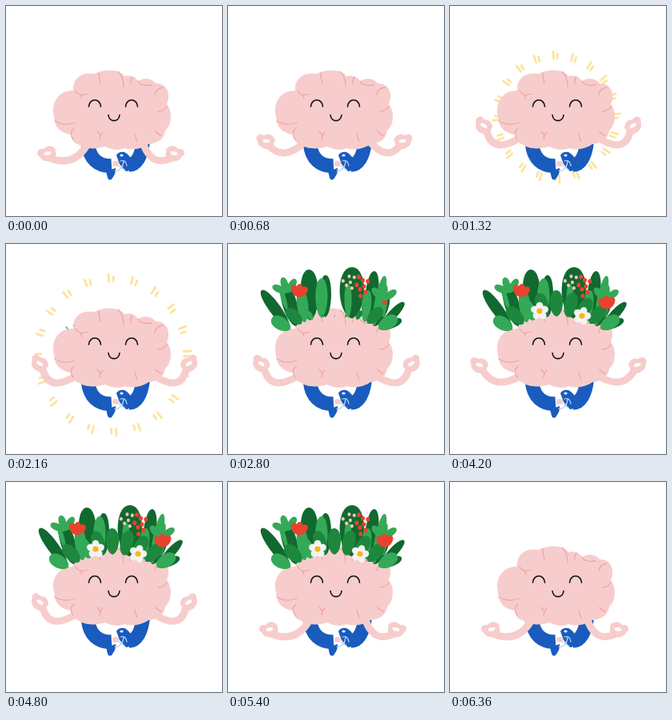
These frames come from a looping animation (270 px wide and 263 px high, 6400 ms). An HTML page with a canvas:

```html
<!DOCTYPE html>
<html lang="en">
<head>
<meta charset="utf-8">
<title>Blooming mind</title>
<style>
html, body { margin: 0; width: 100%; height: 100%; overflow: hidden; background: #fff; }
canvas { display: block; width: 270px; height: 263px; }
</style>
</head>
<body>
<canvas id="stage" width="270" height="263"></canvas>
<script>
const ctx = document.getElementById('stage').getContext('2d');
const LOOP = 6400, TAU = Math.PI * 2, MIDDLE = 134;
const SKIN = '#f6cdcc', FOLD = '#f3a5a3', BLUE = '#195cbd', RED = '#e8432f';
const DARK = '#11692f', MID = '#1d873d', LIGHT = '#34a957';

const clamp = u => Math.max(0, Math.min(1, u));
const smooth = u => { u = clamp(u); return u * u * (3 - 2 * u); };
const mix = (a, b, u) => a.map((v, i) => v + (b[i] - v) * u);
const ramp = (t, from, to) => smooth((t - from) / (to - from));
const grow = (t, start) => ramp(t, start, start + 420) * (1 - ramp(t, 5450, 6110));

// Left arm: shoulder, elbow, hand, hand angle, axis that mirrors the hand
const LOW = [100, 176, 84, 201, 51, 186, 0, 131];
const UP = [88, 165, 52, 187, 40.5, 150, .85, 135.5];
const WIDE = [88, 165, 58, 182, 31, 154, .3, 135.5];

const brain = new Path2D(`M59 133 C58 117 69 105 84 106 C83 91 94 82 111 85
  C122 78 143 79 148 88 C155 86 162 89 165 94 C174 88 184 92 187 97
  C200 96 207 109 201 123 C208 131 208 149 199 156 C198 166 190 172 178 173
  C170 179 157 181 148 178 C140 182 130 179 124 176 C112 180 97 179 90 173
  C85 172 82 168 81 161 C71 160 63 154 61 145 Z`);
const folds = new Path2D(`M87 106 Q91 114 102 110 M93 111 L95 116 M116 84 Q116 91 118 97
  M140 82 Q147 88 147 101 M158 89 Q155 93 156 98 M165 94 Q168 101 182 99
  M186 111 Q187 103 196 102 M190 132 Q197 132 201 126 M61 144 Q73 151 86 146
  M84 167 Q78 159 85 153 M114 157 L118 162 L121 158 M118 162 L117 167
  M161 160 Q162 166 164 170 M187 157 Q190 161 194 162`);
const face = new Path2D(`M103.5 126 C104 115 118 115 118.5 126
  M149.5 126 C150 115 164 115 164.5 126 M128 136.5 C129 146 141 146 142 136.5`);
const legs = new Path2D('M102.5 172 C104 191 115 201 132 200 M171 172 C169 188 163 199 154 199');
const shoes = new Path2D(`M125 207 L137 203 Q138 209 132 217 Q128 219 127 215 Z
  M138 187 Q141 182 148 183 Q156 187 157 195 Q158 207 150 207 L142 198 Z`);
const laces = new Path2D('M136 206 Q141 208 145 201 M141 200 L148 205 M143 194 Q150 192 151 200 M147 195 L145 203');

function stroke(path, color, width) {
  ctx.strokeStyle = color;
  ctx.lineWidth = width;
  ctx.stroke(path);
}

function fill(path, color) {
  ctx.fillStyle = color;
  ctx.fill(path);
}

function oval(x, y, rx, ry, color, angle = 0) {
  const path = new Path2D();
  path.ellipse(x, y, rx, ry, angle, 0, TAU);
  fill(path, color);
}

// Draws in local coordinates; a negative scale mirrors sideways
function place(x, y, angle, scale, draw) {
  if (!scale) return;
  ctx.save();
  ctx.translate(x, y);
  ctx.rotate(angle);
  ctx.scale(scale, Math.abs(scale));
  draw();
  ctx.restore();
}

function drawRays(t) {
  if (t < 700 || t > 2560) return;
  const reach = t < 1320
    ? 50 + 32 * (1 - (1 - (t - 700) / 620) ** 2)
    : 82 + 27 * clamp((t - 1320) / 1180);
  const path = new Path2D();
  for (let i = 0; i < 40; i++) {
    const short = i % 2;
    const a = (i - short) * TAU / 40 - .05 + short * .064;
    const dx = Math.sin(a) * .97, dy = -Math.cos(a);
    for (const [r, op] of [[reach - 3 * short, 'moveTo'], [reach - 9, 'lineTo']]) {
      path[op](133 + dx * r, 139 + dy * r);
    }
  }
  ctx.globalAlpha = 1 - ramp(t, 2250, 2560);
  stroke(path, '#fde29a', 2.7);
  ctx.globalAlpha = 1;
}

function drawLegs() {
  ctx.lineCap = 'butt';
  stroke(legs, BLUE, 17.5);
  ctx.lineCap = 'round';
  fill(shoes, BLUE);
  oval(137, 197.5, 4, 3.5, SKIN);
  oval(144.5, 187, 2.2, 1.6, '#e2efff');
  stroke(laces, '#b7d2f3', 1.3);
}

function drawArm([sx, sy, ex, ey, hx, hy, turn, axis], mirrored) {
  const flip = (x, about) => mirrored ? 2 * about - x : x;
  const handX = flip(hx, axis), side = mirrored ? -1 : 1;
  const path = new Path2D();
  path.moveTo(flip(sx, 136.5), sy);
  path.quadraticCurveTo(flip(ex, (axis + 136.5) / 2), ey, handX + 5 * side, hy + 5);
  stroke(path, SKIN, 9);
  place(handX, hy, turn * side, side, () => {
    oval(1, 0, 10.5, 8.5, SKIN);
    oval(-7, -2, 5, 5, SKIN);
    oval(4, -6, 7, 4.5, SKIN, .2);
    oval(1, -1.5, 4.5, 2.2, '#fff', -.25);
  });
}

function drawArms(t) {
  const lift = ramp(t, 200, 1240) - ramp(t, 4740, 5400);
  const spread = ramp(t, 2710, 3340) - ramp(t, 3850, 4600);
  const pose = mix(mix(LOW, UP, lift), WIDE, spread);
  drawArm(pose, false);
  drawArm(pose, true);
}

function leaf(x, y, angle, len, w, color, size) {
  place(x, y, angle, size, () => {
    const path = new Path2D();
    path.moveTo(0, 0);
    path.bezierCurveTo(-w * .65, -len * .1, -w * .7, -len, 0, -len);
    path.bezierCurveTo(w * .7, -len, w * .65, -len * .1, 0, 0);
    fill(path, color);
  });
}

// Height of the planted edge across the top of the head
const rim = x => 91 + 18 * ((x - MIDDLE) / 60) ** 2;

// A leaf known by its tip; its root crowds towards the head
function tallLeaf(tipX, tipY, width, color, size) {
  const x = MIDDLE + 62 * Math.tanh((tipX - MIDDLE) / 60), y = rim(x);
  leaf(x, y, Math.atan2(tipX - x, y - tipY), Math.hypot(tipX - x, tipY - y), width, color, size);
}

function sprig(x, y, angle, size) {
  leaf(x, y + 28, angle, 30, 6, LIGHT, size);
  for (const a of [-.85, 0, .85]) leaf(x, y + 6, angle + a, 20, 9, LIGHT, size);
}

// Short leaves fanned along the rim, opening from the ends inwards
function fringe(t) {
  for (let i = 0; i < 9; i++) {
    const out = Math.abs(i - 4) / 4, x = 78 + 13.8 * i;
    const color = i % 8 && i !== 2 ? MID : LIGHT;
    leaf(x, rim(x), (x - MIDDLE) / 54, 33 - 6 * out, 16, color, grow(t, 2740 - 500 * out ** 2));
  }
}

// Dots wound in a spiral, riding on the big leaf as it rises
function dots(x, y, count, r, color, size) {
  for (let i = 0; i < count; i++) {
    const d = 5 * Math.sqrt(i + .3);
    const dx = x - 148 + d * .7 * Math.cos(i * 2.4), dy = y - 92 + d * Math.sin(i * 2.4);
    oval(148 + dx * size, 92 + dy * size, r * size, r * 1.15 * size, color);
  }
}

function tulip(x, y, angle, size) {
  place(x, y, angle, size, () => {
    for (const a of [-.6, .6, 0]) leaf(0, 8, a, 16, 9, RED, 1);
  });
}

function daisy(x, y, angle, size) {
  place(x, y, angle, size, () => {
    for (let i = 0; i < 5; i++) {
      const a = i * TAU / 5;
      oval(Math.sin(a) * 6.3, -Math.cos(a) * 6.3, 4.5, 5, '#f3f4f2', a);
    }
    oval(0, 0, 3.6, 3.4, '#fab515');
  });
}

function drawPlants(t) {
  const dark = [[42, 58, 14], [70, 50, 18], [101, 32, 22], [122, 39, 14], [155, 29, 30],
    [183, 34, 16], [198, 60, 18], [220, 73, 11], [217, 95, 11]];
  const light = [[91, 57, 14], [117, 43, 15], [150, 50, 9], [175, 58, 12], [196, 40, 11]];
  dark.forEach((tip, i) => tallLeaf(...tip, DARK, grow(t, 2090 + 25 * i)));
  light.forEach((tip, i) => tallLeaf(...tip, LIGHT, grow(t, 2150 + 25 * i)));
  sprig(74, 55, -.3, grow(t, 2260));
  sprig(194, 64, .1, grow(t, 2260));
  fringe(t);
  dots(151, 48, 6, 2, '#f4c8bc', grow(t, 2160));
  dots(168, 53, 8, 2.5, RED, grow(t, 2260));
  tulip(89, 58, .15, grow(t, 2400));
  tulip(196, 73, -.1, grow(t, 2640));
  daisy(112, 84, 0, grow(t, 2840));
  daisy(165, 90, .3, grow(t, 2940));
}

function draw(now) {
  const t = now % LOOP;
  ctx.fillStyle = '#fff';
  ctx.fillRect(0, 0, 270, 263);
  ctx.lineCap = ctx.lineJoin = 'round';
  drawRays(t);
  drawLegs();
  drawArms(t);
  fill(brain, SKIN);
  stroke(folds, FOLD, 1.3);
  stroke(face, '#111', 1.6);
  drawPlants(t);
  requestAnimationFrame(() => draw(performance.now()));
}
draw(0);
</script>
</body>
</html>
```
